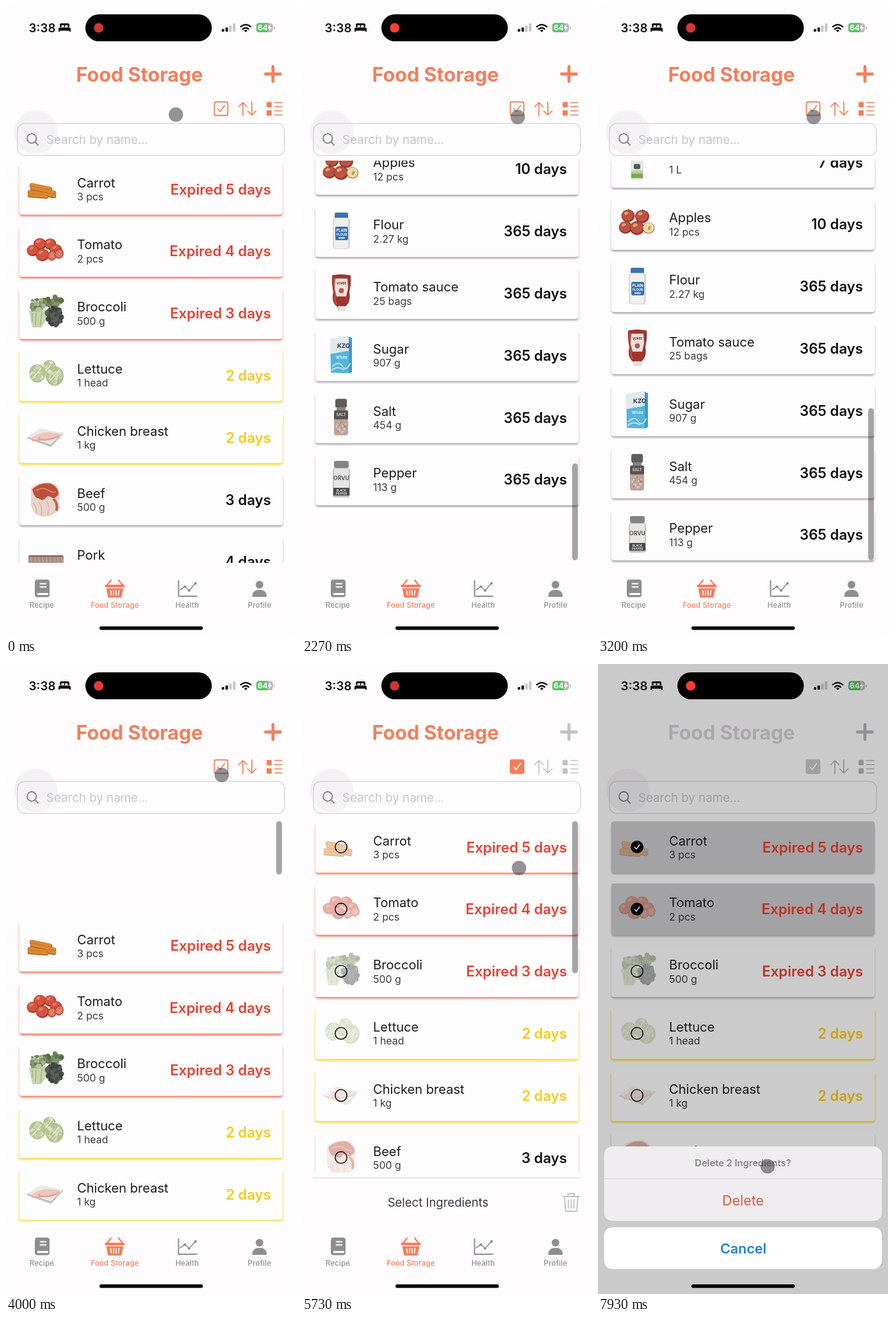
These frames come from a looping animation (453 by 982 pixels, 8 s). An HTML page:

```html
<!DOCTYPE html>
<html lang="en">
<head>
<meta charset="utf-8">
<title>Food Storage</title>
<style>
html, body { margin: 0; width: 100%; height: 100%; overflow: hidden; background: #fefcfd; }
svg { display: block; width: 100%; height: 100%; }
text { font-family: Inter, "Open Sans", sans-serif; }
.line { fill: none; stroke-linecap: round; stroke-linejoin: round; }
</style>
</head>
<body>
<svg id="stage" viewBox="0 0 453 982" xmlns="http://www.w3.org/2000/svg"></svg>
<script>
const LOOP = 8000, PITCH = 96.8, FIRST = 285.3, MAX = 1010;
const CORAL = '#f47e5c', GRAY = '#8f8d91', PALE = '#c3c1c4';
const RED = '#ee3f30', YELLOW = '#fcc917', BLACK = '#111012';

// Times of the taps
const SELECT = 4950, PICKS = [5950, 6400], SHEET = 7380;

// --- Drawing helpers ---
const box = (x, y, w, h, fill, r = 0, more = '') =>
  `<rect x="${x}" y="${y}" width="${w}" height="${h}" rx="${r}" fill="${fill}" ${more}/>`;
const oval = (x, y, rx, ry, fill, turn = 0) =>
  `<ellipse rx="${rx}" ry="${ry}" fill="${fill}" transform="translate(${x} ${y}) rotate(${turn})"/>`;
const shape = (d, fill) => `<path d="${d}" fill="${fill}"/>`;
const line = (d, color, w, more = '') =>
  `<path class="line" d="${d}" stroke="${color}" stroke-width="${w}" ${more}/>`;
const text = (s, x, y, size, fill, weight = 400, anchor = 'start', more = '') =>
  `<text x="${x}" y="${y}" font-size="${size}" fill="${fill}" font-weight="${weight}" text-anchor="${anchor}" ${more}>${s}</text>`;
const group = (id, body, more = '') => `<g id="${id}" ${more}>${body}</g>`;

function cluster(n, x, y, rx, ry, size, colors, seed) {
  let out = '';
  const rand = () => (seed = seed * 16807 % 2147483647) / 2147483647;
  for (let i = 0; i < n; i++) {
    const a = rand() * 6.283, d = Math.sqrt(rand());
    const r = size * (0.6 + rand() * 0.6);
    out += oval((x + Math.cos(a) * d * rx).toFixed(1), (y + Math.sin(a) * d * ry).toFixed(1),
      r.toFixed(1), r.toFixed(1), colors[i % colors.length]);
  }
  return out;
}
const ball = (x, y, r, base, dark, light) =>
  oval(x, y, r, r * 0.94, dark) + oval(x - 0.6, y - 1, r * 0.85, r * 0.78, base) +
  oval(x - r * 0.25, y - r * 0.4, r * 0.35, r * 0.22, light, -25);

// --- Food pictures, centred on 0,0 ---
const art = {
  carrot() {
    const stick = (x1, y1, x2, y2) =>
      line(`M${x1} ${y1}L${x2} ${y2}`, '#a8622a', 6.6) +
      line(`M${x1} ${y1 - 0.6}L${x2} ${y2 - 0.6}`, '#dd8830', 4.8);
    return stick(-21, -6, 8, 0) + stick(-20, -1, 14, 6) + stick(-24, 5, 14, 11) + stick(-24, 10, 2, 12);
  },
  tomato() {
    const t = (x, y, r) => ball(x, y, r, '#d3543f', '#b23c2c', '#e58068');
    const cut = (x, y) => oval(x, y, 7, 8, '#b94632', 20) + oval(x, y, 5.6, 6.4, '#de7660', 20) +
      line(`M${x - 3} ${y - 3}l6 6m0-6l-5 6`, '#edaa96', 1);
    return t(-8, -11, 10) + t(8, -11, 9.5) + t(-19, -1, 9.5) + t(17, -2, 9.5) + t(-4, 6, 10.5) +
      cut(11, 7) + cut(22, 4);
  },
  broccoli: () =>
    cluster(50, 11, -19, 15, 7, 3.6, ['#6f8056', '#82946a', '#5c6b48'], 11) +
    shape('M-25-4L2-6L2 10L-6 22L-20 22Z', '#c9d3ac') +
    line('M-15 18L-14 0M-7 18L-5-2M-20 12L-20 0', '#a4b584', 1.6) +
    cluster(45, -13, -13, 11, 9, 3.2, ['#86956f', '#a6b38b', '#6a7a58', '#bac5a2'], 29) +
    cluster(90, 14, 4, 12, 15, 3.4, ['#4b504c', '#5a605a', '#3f4440'], 47),
  lettuce() {
    const head = (x, y, r, seed) => oval(x, y, r, r * 1.1, '#b4c28f') +
      cluster(30, x, y, r * 0.8, r * 0.85, 3.2, ['#cfd8b3', '#b4c48f', '#dbe2c5', '#c1cea0'], seed) +
      line(`M${x - r * 0.6} ${y + r * 0.6}Q${x} ${y} ${x + r * 0.5} ${y - r * 0.7}`, '#e9eed8', 1.3);
    return head(7, -13, 10, 5) + head(-12, -3, 13, 17) + head(15, 1, 14, 31);
  },
  chicken: () =>
    shape('M-29 1L-7-14L29-6L9 15Z', '#c4bfbd') + shape('M-28-1L-7-14L28-7L9 11Z', '#ebe8e6') +
    oval(-5, -1, 17, 5.4, '#dfaa9d', -16) + oval(-5, -2.2, 15, 4, '#eecabf', -16) +
    oval(6, -1, 17, 5.2, '#dca599', -9) + oval(6, -2.2, 15, 3.8, '#edc7bc', -9),
  beef: () =>
    shape('M-22-18Q-12-28 8-27Q22-23 23-9Q20 4 24 14Q14 26-2 27Q-20 24-22 8Z', '#ead3ca') +
    shape('M-20-16Q-8-27 8-25Q21-20 21-8Q14 1 9-4Q3-7 0-1Q-6 3-10-2Q-17-2-20-16Z', '#bd513c') +
    line('M-14-14Q-4-20 4-15T16-12', '#d98d78', 1.4) +
    line('M14 0Q20 6 18 16', '#c4634e', 4) +
    line('M-18 6Q-12 14-14 22M-8 6Q-4 14-6 24M3 3Q8 14 4 24', '#dcb5a8', 1.6),
  pork: () => {
    let ribs = box(-26, -10, 55, 22, '#a98a84', 2);
    for (let x = -22; x < 28; x += 6) ribs += line(`M${x}-6l2 15`, '#bfa29b', 2);
    return ribs + line('M-24-8.5L27-8.5', '#846661', 2);
  },
  shrimp: () => [-14, 0, 14].map(x =>
    line(`M${x - 8} 10Q${x - 8}-10 ${x + 8}-8`, '#ec9a80', 8)).join(''),
  salmon: () => shape('M-27 4Q-10-16 27-8L24 10Q0 16-27 4Z', '#f08a62') +
    line('M-16 2Q-4-4 2-10M-2 8Q8 2 14-7', '#f9c3a8', 1.8),
  eggs: () => oval(-13, 3, 11, 14, '#d9a577') + oval(13, 3, 11, 14, '#cf9868') + oval(0, 7, 11, 14, '#e4b78e'),
  milk: () => box(-6, -28, 12, 7, '#6d8fb5', 2) + box(-10, -20, 20, 48, '#e6e7e2', 4) +
    box(-5, 3, 10, 8, '#4d5f5c', 2) + box(-9, 13, 18, 5, '#b9cf9a') + box(-9, 18, 18, 7, '#79a653'),
  apples() {
    const a = (x, y, r) => ball(x, y, r, '#be5243', '#9c3a2f', '#dba273') +
      line(`M${x} ${y - r * 0.6}l1-4`, '#6b4a2c', 1.2);
    return a(-14, -13, 10.5) + a(8, -12, 11) + a(-18, 5, 10.5) + a(0, 6, 11.5) +
      oval(18, 6, 9.5, 9, '#c0824f') + oval(18, 5.6, 8.2, 8, '#e9dca8') + oval(19, 6, 2, 3.4, '#b79a68', 20);
  },
  flour: () => box(-10, -29, 21, 9, '#3f72b0', 2) + box(-13, -21, 27, 49, '#d8d8da', 5) +
    box(-11, -20, 22, 47, '#efefef', 4) + box(-9, -7, 20, 21, '#3a6fae', 2) +
    text('PLAIN', 1, 1, 5.6, '#fff', 700, 'middle') + text('FLOUR', 1, 7, 5, '#fff', 700, 'middle') +
    box(-4, 9, 10, 3, '#a9c8e6', 1),
  sauce: () => shape('M-14-28Q0-31 15-28Q16-14 13-2Q16 14 6 21L-6 21Q-16 14-12-2Q-15-14-14-28Z', '#9f352f') +
    line('M-11-24Q-11-8-9 0Q-11 10-7 16', '#bf5c53', 1.8) + box(-6, 20, 13, 8, '#e4e1df', 2.5) +
    shape('M-9-23L10-23L11-8L8 5L-7 5L-10-8Z', '#eae3db') +
    text('VORBE', 0.5, -14, 4.6, '#77362f', 700, 'middle') + oval(0.5, -4, 4, 4, '#b9574b'),
  sugar: () => shape('M-17-25L10-30L17-27L17 26L10 28L-16 27Z', '#55b4dc') +
    shape('M-17-25L10-30L17-27L17-8L-17-2Z', '#e3e9ed') + shape('M12-29L17-27L17 26L12 28Z', '#3b9ccb') +
    text('KZO', 4, -12, 9.5, '#2d3b57', 700, 'middle') + text('White', 1, 5, 6.5, '#e8f6fc', 600, 'middle') +
    line('M-13 17Q-4 8 2 17T14 13M-14 23Q-6 16 4 22', '#bfe4f4', 2),
  salt: () => box(-9, -29, 18, 14, '#5f5c5b', 3) + box(-7, -16, 14, 6, '#8b8583') +
    box(-11, -11, 22, 39, '#bda396', 4) + box(-11, -11, 22, 14, '#585453', 2) +
    text('SALT', 0, -2, 6, '#d2cecb', 700, 'middle') +
    cluster(32, 0, 15, 8, 9, 1.5, ['#d3bcb0', '#a78b7e', '#dccbc1'], 71),
  pepper: () => box(-11, -29, 23, 11, '#848385', 3) + box(-13, -18, 27, 46, '#c4c3c3', 4) +
    box(-11, -17, 23, 31, '#e6e5e3', 2) + text('ORVU', 0.5, 1, 8.6, '#5d5b5b', 700, 'middle') +
    box(-12, 13, 25, 12, '#4a494a', 1) + text('BLACK', 0.5, 18.5, 4.6, '#ddd', 700, 'middle') +
    text('PEPPER', 0.5, 23.5, 4.6, '#ddd', 700, 'middle')
};

const items = [
  ['Carrot', '3 pcs', -5, 'carrot'], ['Tomato', '2 pcs', -4, 'tomato'],
  ['Broccoli', '500 g', -3, 'broccoli'], ['Lettuce', '1 head', 2, 'lettuce'],
  ['Chicken breast', '1 kg', 2, 'chicken'], ['Beef', '500 g', 3, 'beef'],
  ['Pork', '500 g', 4, 'pork'], ['Shrimp', '300 g', 4, 'shrimp'],
  ['Salmon', '400 g', 5, 'salmon'], ['Eggs', '12 pcs', 7, 'eggs'],
  ['Milk', '1 L', 7, 'milk'], ['Apples', '12 pcs', 10, 'apples'],
  ['Flour', '2.27 kg', 365, 'flour'], ['Tomato sauce', '25 bags', 365, 'sauce'],
  ['Sugar', '907 g', 365, 'sugar'], ['Salt', '454 g', 365, 'salt'],
  ['Pepper', '113 g', 365, 'pepper']
];

function card([name, amount, days, pic], i) {
  const late = days < 0, soon = days === 2;
  const color = late ? RED : soon ? YELLOW : BLACK;
  const glow = late ? '#f88a74' : soon ? '#fdd93f' : '#b5b3b7';
  const label = (late ? 'Expired ' : '') + Math.abs(days) + ' days';
  const inset = soon ? 20 : 20.6;
  return `<g transform="translate(0 ${FIRST + i * PITCH})">` +
    box(inset, -37.5, 453 - 2 * inset, 80.3, glow, 5, `filter="url(#soft)" class="${late ? 'late' : ''}"`) +
    box(20.8, -40, 411.4, 80, '#fefdfe', 4, `id="face${i}"`) +
    `<g class="pic" transform="translate(61 0)">${art[pic]()}</g>` +
    `<g class="mark" transform="translate(61 0)"><circle id="ring${i}" r="9.2" fill="none" stroke="#111" stroke-width="1.6"/>` +
    line('M-3.6.4L-1 3.2L3.8-3.4', '#fff', 1.7, `id="tick${i}" visibility="hidden"`) + '</g>' +
    text(name, 111, -2.7, 20.1, '#1c1b1d') + text(amount, 111, 17.8, 15.9, '#3a393b') +
    text(label, 414, 8.2, 22.2, color, 600, 'end') + '</g>';
}

const tab = (name, x, color) => text(name, x, 938, 11.4, color, 500, 'middle', 'letter-spacing=".2"');

// --- Scene ---
const stage = document.getElementById('stage');
stage.innerHTML =
  `<defs><filter id="soft" x="-5%" y="-20%" width="110%" height="140%"><feGaussianBlur stdDeviation="1.1"/></filter>
  <clipPath id="view"><rect id="window" y="241" width="453" height="627"/></clipPath></defs>` +
  box(0, 0, 453, 982, '#fefcfd') +
  `<g clip-path="url(#view)">${group('list', items.map(card).join(''))}</g>` +
  box(422, 245, 9, 237, '#000', 4.5, 'id="bar"') +
  // Header
  text('Food Storage', 208.5, 117.8, 30.6, CORAL, 700, 'middle', 'id="title"') +
  group('tools',
    line('M417 94.5V117.5M405.5 106H428.5', 'currentColor', 4.8) +
    line('M370 171V150.5M363.5 157L370 150.5L376.5 157M384 149.5V170M377.5 163.5L384 170L390.5 163.5', 'currentColor', 1.7) +
    box(407, 149.5, 8, 8.5, 'currentColor', 1.5) + box(407, 162.5, 8, 8.5, 'currentColor', 1.5) +
    line('M419.5 150.5H431M419.5 156.8H431M419.5 163.5H431M419.5 169.8H431', 'currentColor', 1.5)) +
  group('check', box(325.5, 149.5, 21, 21, 'none', 2.5, 'id="checkbox" stroke-width="1.8" stroke="currentColor"') +
    line('M331 160.5L334.6 164.6L341.5 155', CORAL, 1.7, 'id="checktick"')) +
  // Search field
  box(18, 183, 417, 50, '#fefdfe', 11, 'stroke="#dcdadd" stroke-width="1.5"') +
  '<circle cx="46.5" cy="197" r="34" fill="#a9a7b4" opacity=".12"/>' +
  line('M46 212.5L50.3 216.8M47.5 206.5a7.3 7.3 0 1 1-14.6 0a7.3 7.3 0 1 1 14.6 0', '#7f7d82', 1.8) +
  text('Search by name...', 63, 215, 18.7, '#c6c4c8') +
  // Selection panel
  group('panel', line('M18 801H435', '#e2e0e3', 1.6) +
    text('', 212.5, 846.3, 18.5, '#3a393b', 400, 'middle', 'id="hint"') +
    line('M407.5 830H433.5M415.5 829.5V825.5H425.5V829.5M410 830.5L411.8 853H429.2L431 830.5M416 835.5L416.5 848M420.5 835.5V848M425 835.5L424.5 848', 'currentColor', 1.8, 'id="trash"')) +
  // Tab bar
  box(45, 894, 23, 27.5, GRAY, 4) + box(49, 915, 17, 3, '#fefcfd') +
  line('M53.5 900.5H62.5M53.5 905.5H62.5', '#fefcfd', 1.8) + tab('Recipe', 56, GRAY) +
  line('M157.5 903L164 895M182.5 903L176 895', CORAL, 2.2) + box(154.5, 902, 31, 4, CORAL, 1.5) +
  shape('M156.5 907.5H183.5L180.5 922H159.5Z', CORAL) +
  line('M163.5 911L164.5 918M168 911V918M172 911V918M176.5 911L175.5 918', '#fefcfd', 1.7) + tab('Food Storage', 170, CORAL) +
  line('M269.5 896V920H298', GRAY, 2) + line('M272 910L279.5 905L286 911L296 900', GRAY, 1.6) +
  [[279.5, 905], [286, 911], [296, 900]].map(p => oval(p[0], p[1], 2.1, 2.1, GRAY)).join('') + tab('Health', 283, GRAY) +
  oval(396, 902, 6, 6, GRAY) + shape('M385 921V918Q386 910 396 910T407 918V921Z', GRAY) + tab('Profile', 396, GRAY) +
  // Status bar
  text('3:38', 35.5, 40.5, 18.8, '#111', 600) +
  shape('M84 33V29.5Q84 27 86.5 27H96.5Q99 27 99 29.5V33Z', '#111') + box(86.5, 30, 4.3, 3, '#fefcfd', 1) + box(92.2, 30, 4.3, 3, '#fefcfd', 1) +
  shape('M82 40V36Q82 33.5 84.5 33.5H98.5Q101 33.5 101 36V40H99V38.5H84V40Z', '#111') +
  [4, 6.5, 9.5, 13].map((h, i) => box(337 + i * 5.8, 40 - h, 4, h, i < 2 ? '#111' : '#c9c7ca', 1)).join('') +
  line('M366.8 32.2Q374.5 25.6 382.2 32.2M370 35.8Q374.5 32 379 35.8', '#111', 2.4) + shape('M371.8 38Q374.5 36 377.2 38L374.5 41Z', '#111') +
  box(391, 26.5, 26, 14.5, '#b9b8bb', 4.5) + shape('M395.5 26.5H409V41H395.5Q391 41 391 36.5V31Q391 26.5 395.5 26.5Z', '#5bc267') +
  box(418, 31.5, 1.6, 5, '#b9b8bb', 0.8) + text('64', 393, 38.2, 12, '#fff', 700) + shape('M413.5 28.5L408.7 34.8H411.6L410.6 39.5L415.6 33H412.6Z', '#fff') +
  // Action sheet
  box(0, 0, 453, 982, '#000', 0, 'id="dim"') +
  group('sheet', box(9.5, 752, 434, 116, '#efedef', 13) + box(9.5, 802, 434, 1, '#d6d4d7') +
    text('Delete 2 Ingredients?', 226.5, 782.5, 14.7, '#858387', 600, 'middle') +
    text('Delete', 226.5, 843.7, 21.4, '#e2593a', 400, 'middle') +
    box(9.5, 878, 434, 65, '#fff', 13) + text('Cancel', 227, 918.7, 21.5, '#1b80de', 600, 'middle')) +
  // Always on top
  box(124, 13, 197.5, 42, '#000', 21) + '<circle id="dot" cx="144.7" cy="34" r="7.4"/>' +
  box(146, 967, 161.5, 5.4, '#000', 2.7) +
  '<circle id="cursor" r="11.2" fill="#3a383d" opacity=".54"/>';

// --- Motion ---
const $ = id => document.getElementById(id);
const set = (id, o) => { for (const k in o) $(id).setAttribute(k, o[k]); };
const clamp = (v, a = 0, b = 1) => Math.min(b, Math.max(a, v));
const ramp = (t, a, b) => { const u = clamp((t - a) / (b - a)); return u * u * (3 - 2 * u); };

// Monotone cubic curve through [time, value] points
function curve(p, t) {
  if (t <= p[0][0]) return p[0][1];
  const n = p.length - 1;
  if (t >= p[n][0]) return p[n][1];
  const rate = i => (p[i + 1][1] - p[i][1]) / (p[i + 1][0] - p[i][0]);
  const slope = i => {
    if (i === 0 || i === n) return 0;
    const a = rate(i - 1), b = rate(i);
    return a * b <= 0 ? 0 : 2 * a * b / (a + b);
  };
  let i = 0;
  while (t > p[i + 1][0]) i++;
  const h = p[i + 1][0] - p[i][0], u = (t - p[i][0]) / h, v = 1 - u;
  return p[i][1] * v * v * (1 + 2 * u) + p[i + 1][1] * u * u * (3 - 2 * u) +
    h * u * v * (slope(i) * v - slope(i + 1) * u);
}

const scrollKeys = [[1650, 0], [1850, 270], [2150, 1010], [2270, 1096], [2450, 1040], [2720, MAX],
  [3330, MAX], [3550, 740], [3860, -50], [4000, -154], [4200, -70], [4400, -18], [4680, 0]];
const cursorX = [[250, 265.4], [1000, 337], [5100, 337], [5600, 339], [6000, 339], [6300, 325], [6550, 325],
  [7050, 420], [7450, 420], [7930, 265]];
const cursorY = [[250, 169.3], [1000, 173], [5100, 173], [5600, 318], [6000, 318], [6300, 384], [6550, 384],
  [7050, 838], [7450, 838], [7930, 783]];

const pics = stage.querySelectorAll('.pic'), marks = stage.querySelectorAll('.mark');
const lateGlows = stage.querySelectorAll('.late');

function render(t) {
  const scroll = curve(scrollKeys, t), inside = clamp(scroll, 0, MAX), over = scroll - inside;
  const picking = t >= SELECT, modal = t >= SHEET;
  const picked = PICKS.filter(p => t >= p).length;

  set('list', { transform: `translate(0 ${-scroll})` });
  set('window', { height: picking ? 552 : 627 });
  set('bar', {
    y: 245 + 382 * inside / MAX + Math.max(0, over), height: 237 - Math.abs(over),
    opacity: 0.35 * ramp(t, 1680, 1800) * (1 - ramp(t, 6000, 6300))
  });

  set('title', { fill: modal ? '#d3d1d4' : CORAL });
  set('tools', { color: modal ? '#b4b2b5' : picking ? PALE : CORAL });
  const tint = modal ? '#c8c6c9' : CORAL;
  set('check', { color: tint });
  set('checkbox', { fill: picking ? tint : 'none' });
  set('checktick', { stroke: picking ? '#fff' : CORAL });

  pics.forEach(p => p.setAttribute('opacity', picking ? 0.45 : 1));
  marks.forEach(m => m.setAttribute('visibility', picking ? 'inherit' : 'hidden'));
  lateGlows.forEach(g => g.setAttribute('fill', modal ? '#c3c1c4' : '#f88a74'));
  PICKS.forEach((p, i) => {
    const on = t >= p;
    set('face' + i, { fill: on ? '#cccacd' : '#fefdfe' });
    set('ring' + i, { fill: on ? '#000' : 'none' });
    set('tick' + i, { visibility: on ? 'inherit' : 'hidden' });
  });

  set('panel', { visibility: picking ? 'visible' : 'hidden' });
  set('trash', { color: picked && !modal ? CORAL : PALE });
  $('hint').textContent = picked ? `${picked} Ingredient${picked > 1 ? 's' : ''} Selected` : 'Select Ingredients';

  const rise = ramp(t, SHEET, SHEET + 330);
  set('dim', { opacity: 0.2 * rise });
  set('sheet', { transform: `translate(0 ${240 * (1 - rise)})` });

  const glow = 0.5 + 0.5 * Math.cos((t - 2270) / 1415 * 2 * Math.PI);
  set('dot', { fill: `rgb(${200 + 55 * glow},${54 + 6 * glow},${46 + 3 * glow})` });
  set('cursor', { cx: curve(cursorX, t), cy: curve(cursorY, t) });
}

const start = performance.now();
function tick() {
  render((performance.now() - start) % LOOP);
  requestAnimationFrame(tick);
}
tick();
</script>
</body>
</html>
```
